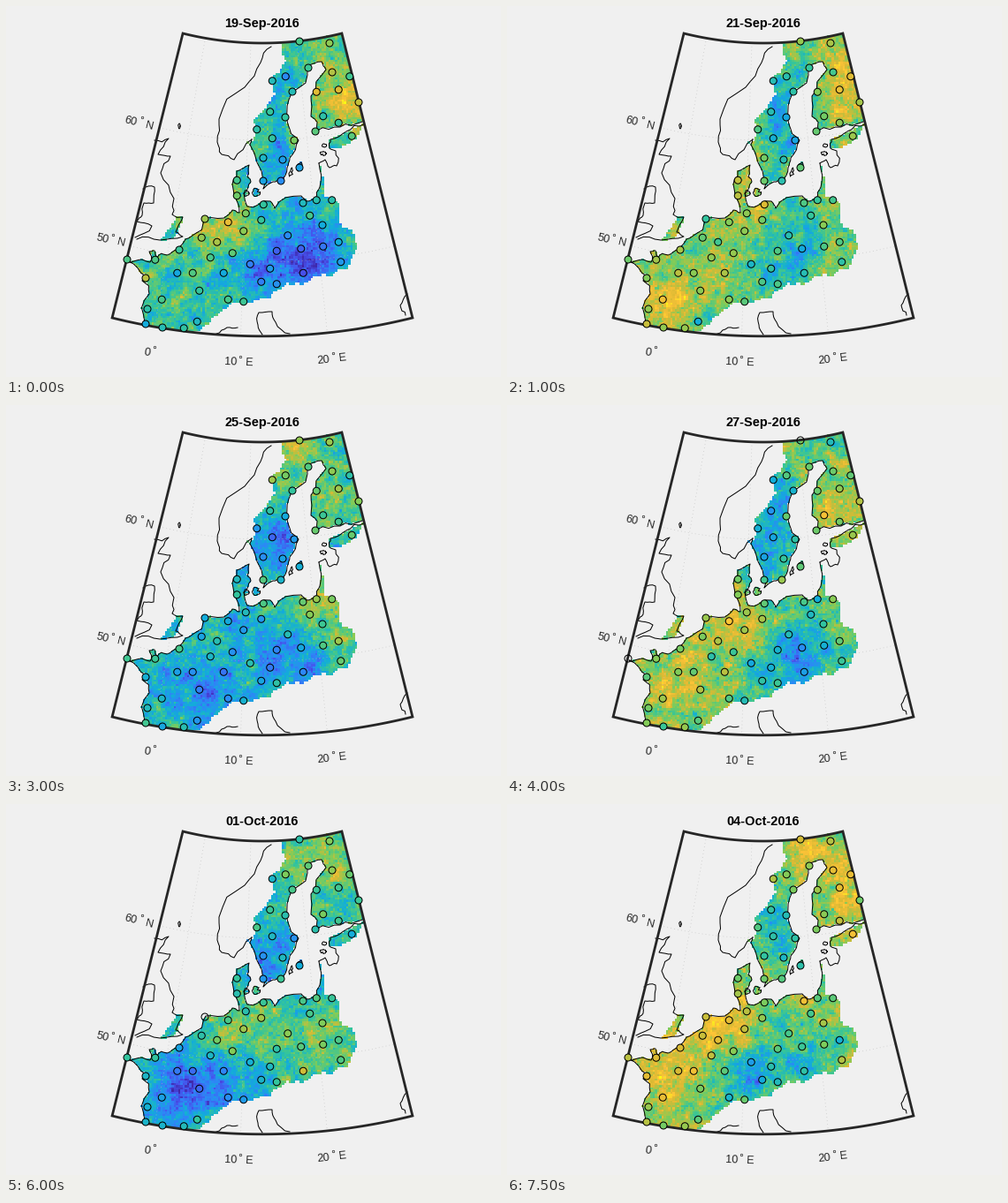
Write a matplotlib script that moves like this. It is 560x420 px and loops after 8000 ms.

```python
import numpy as np
import matplotlib.pyplot as plt
from matplotlib.animation import FuncAnimation
from matplotlib.colors import LinearSegmentedColormap
from matplotlib.path import Path

W, H, DPI = 560, 420, 100
PX = 72 / DPI
INK = "#262626"
plt.rcParams["font.family"] = "Liberation Sans"

parula = LinearSegmentedColormap.from_list("parula", [
    (0, "#3e26a8"), (.12, "#4751ec"), (.25, "#2e87f7"), (.375, "#12adda"),
    (.5, "#35c59b"), (.625, "#81cc59"), (.75, "#d9ba34"), (.86, "#fdc338"),
    (1, "#f9fb15")])

# Conic projection of the map window
APEX = (290, -331)
R_TOP, R_BOTTOM, HALF = 373, 704.8, 13.95


def polar(r, deg):
    a = np.radians(deg)
    return APEX[0] + r * np.sin(a), APEX[1] + r * np.cos(a)


coast_rng = np.random.default_rng(3)


def rugged(*points, rounds=2, amount=.09):
    """Roughen a line of key points by midpoint displacement."""
    p = np.array(points, float)
    for _ in range(rounds):
        step = np.diff(p, axis=0)
        normal = step[:, ::-1] * (1, -1)
        mid = p[:-1] + step / 2 + normal * coast_rng.normal(0, amount, (len(step), 1))
        out = np.empty((2 * len(p) - 1, 2))
        out[::2], out[1::2] = p, mid
        p = out
    return p


continent = rugged(
    (157, 359), (162, 326), (154, 311), (158, 306), (138, 289), (153, 287),
    (163, 290), (162, 278), (168, 277), (171, 285), (182, 282), (195, 275),
    (203, 264), (217, 256), (226, 240), (252, 236), (256, 231), (264, 234),
    (257, 207), (261, 187), (275, 180), (273, 193), (277, 199), (269, 212),
    (273, 227), (299, 221), (304, 229), (334, 215), (341, 221), (350, 218),
    (355, 205), (354, 178))
inland = rugged(
    (358, 184), (360, 214), (376, 221), (397, 270), (386, 298), (352, 305),
    (335, 316), (317, 314), (298, 332), (256, 337), (218, 368), (157, 372))
baltic = rugged(
    (278, 151), (276, 157), (291, 198), (291, 207), (302, 199), (311, 199),
    (318, 183), (321, 172), (331, 152), (319, 134), (320, 106), (341, 78),
    (341, 68), (357, 63), (362, 72), (345, 102), (345, 125), (352, 141),
    (378, 137), (403, 131))
mountains = rugged(
    (392, 30), (306, 30), (317, 62), (301, 84), (304, 100), (279, 131),
    (284, 144), (269, 158))
norway = rugged(
    (300, 46), (288, 64), (270, 92), (241, 128), (239, 154), (244, 168),
    (258, 174), (278, 151))
britain = rugged(
    (168, 152), (184, 150), (172, 168), (186, 170), (175, 189), (190, 218),
    (188, 236), (200, 239), (192, 256), (200, 261), (174, 265), (148, 264))
wales = rugged(
    (155, 207), (168, 205), (167, 223), (156, 223), (154, 237), (148, 244),
    (165, 249), (146, 262))
estonia = rugged(
    (354, 178), (361, 174), (366, 183), (374, 181), (373, 164), (366, 161),
    (367, 151), (385, 142), (405, 134))
liguria = rugged((238, 371), (250, 364), (262, 364))
adriatic = rugged((290, 372), (285, 361), (286, 347), (301, 346), (305, 358),
                  (321, 371))
black_sea = rugged((454, 326), (446, 339), (452, 350))


def island(x, y, w, h, lean=0):
    t = np.linspace(0, 2 * np.pi, 9)
    cx, cy = w / 2 * np.cos(t), h / 2 * np.sin(t)
    return rugged(*zip(x + cx - lean * cy, y + cy), rounds=1, amount=.25)


zealand, funen = island(283, 211, 9, 9), island(272, 212, 6, 6)
gotland = island(332, 182, 5, 10, .3)
islands = [zealand, funen, gotland, island(322, 188, 2, 10, .3),
           island(359, 167, 7, 5), island(360, 158, 5, 4),
           island(196, 136, 2, 6)]

# Filled areas
east_england = [(174, 266), (187, 249), (195, 237), (201, 241), (194, 257),
                (188, 264)]
estonia_fill = [(366, 152), (394, 139), (405, 134), (396, 151), (376, 162),
                (366, 161)]
areas = [np.vstack([continent, inland]),
         np.vstack([baltic, [(406, 128)], mountains]),
         east_england, estonia_fill, zealand, funen, gotland]

# Raster of cells and its mask
CELL, X0, Y0, NX, NY = 2.5, 130, 31, 112, 138
gx, gy = np.meshgrid(X0 + CELL * (np.arange(NX) + .5),
                     Y0 + CELL * (np.arange(NY) + .5))
cells = np.column_stack([gx.ravel(), gy.ravel()])
mask = np.any([Path(a).contains_points(cells) for a in areas], axis=0)
mask = mask.reshape(NY, NX)
radius = np.hypot(gx - APEX[0], gy - APEX[1])
angle = np.degrees(np.arctan2(gx - APEX[0], gy - APEX[1]))
mask &= (radius > R_TOP) & (radius < R_BOTTOM) & (abs(angle) < HALF)


def place_stations(keys, count, gap, seed=5):
    """Keep the key stations, fill the land with evenly spaced others."""
    found = list(keys)
    land = cells[mask.ravel()]
    for p in np.random.default_rng(seed).permutation(land):
        if len(found) == count:
            break
        if np.hypot(*(np.array(found) - p).T).min() > gap:
            found.append(tuple(p))
    return np.array(found)


# The first three fail on some days
stations = place_stations([
    (332, 40), (137, 287), (225, 241), (366, 42), (342, 70), (369, 75),
    (324, 97), (399, 109), (316, 126), (350, 142), (326, 152), (291, 172),
    (313, 174), (332, 183), (291, 198), (311, 198), (336, 223), (358, 248),
    (196, 276), (158, 308), (160, 343), (158, 360), (177, 364)], 69, 15.5)
missing = {4: [0], 8: [0, 1], 12: [2]}

# Daily weather: a mean level plus warm and cold spots
SPREAD = 30
weather = {}


def day(n, mean, *spots):
    weather[n] = np.full((NY, NX), float(mean))
    for x, y, gain in spots:
        d2 = (gx - x) ** 2 + (gy - y) ** 2
        weather[n] += gain * np.exp(-d2 / (2 * SPREAD ** 2))


day(0, .52, (378, 100, .2), (248, 250, .18), (345, 282, -.35),
    (285, 306, -.25), (316, 90, -.14), (312, 190, -.16))
day(2, .6, (382, 80, .18), (320, 120, -.24), (325, 288, -.2),
    (175, 338, .13), (268, 215, .1), (310, 185, -.12))
day(4, .52, (382, 75, .15), (385, 150, .16), (305, 140, -.17),
    (250, 250, .17), (190, 318, .14), (228, 348, -.3))
day(6, .44, (325, 48, .25), (370, 115, .14), (308, 158, -.2),
    (362, 235, .26), (318, 284, -.18), (230, 330, -.2))
day(8, .58, (375, 110, .17), (310, 95, -.17), (290, 165, -.2),
    (260, 250, .18), (195, 308, .12), (325, 290, -.3))
day(12, .48, (365, 60, .15), (305, 178, -.22), (255, 252, .18),
    (350, 245, .08), (190, 325, -.26), (245, 325, -.2))
day(15, .64, (378, 90, .14), (300, 140, -.24), (235, 248, .17),
    (180, 310, .1), (335, 290, -.2), (275, 312, -.2))


def climate(i):
    a = max(k for k in weather if k <= i)
    b = min(k for k in weather if k >= i)
    t = (i - a) / max(b - a, 1)
    return (1 - t) * weather[a] + t * weather[b]


freq = np.hypot(np.fft.fftfreq(NY)[:, None], np.fft.fftfreq(NX)[None])
spectrum = (freq ** 2 + .06 ** 2) ** -.75


def grain(rng):
    noise = np.fft.fft2(rng.normal(size=(NY, NX))) * spectrum
    noise = np.fft.ifft2(noise).real
    noise = (noise - noise.mean()) / noise.std()
    return .07 * noise + rng.normal(0, .04, (NY, NX))


fig = plt.figure(figsize=(W / DPI, H / DPI), dpi=DPI, facecolor="#f0f0f0")
ax = fig.add_axes([0, 0, 1, 1])
ax.axis("off")
field = ax.imshow(np.zeros((NY, NX, 4)), interpolation="nearest", aspect="auto",
                  extent=(X0, X0 + CELL * NX, Y0 + CELL * NY, Y0), zorder=1)
ax.set(xlim=(0, W), ylim=(H, 0))

for coast in (continent, baltic, norway, britain, wales, estonia, liguria,
              adriatic, black_sea, *islands):
    ax.plot(*coast.T, color="black", lw=PX, zorder=2)

sweep = np.linspace(-HALF, HALF, 80)
grid = dict(lw=.8 * PX, color="#bcbcbc", ls=(0, (1, 4)), zorder=2.5, alpha=.8)
for r in (483, 621):
    ax.plot(*polar(r, sweep), **grid)
for deg in (-9.96, -1.99, 5.98):
    ax.plot(*polar(np.array([R_TOP, R_BOTTOM]), deg), **grid)

border = np.hstack([polar(R_TOP, sweep), polar(R_BOTTOM, sweep[::-1])])
ax.fill(*border, fill=False, ec=INK, lw=2.8 * PX, zorder=3)


def label(x, y, tilt, number, hemi=""):
    c, s = np.cos(np.radians(tilt)), np.sin(np.radians(tilt))

    def at(dx, dy):
        return x + dx * c + dy * s, y - dx * s + dy * c

    style = dict(rotation=tilt, rotation_mode="anchor", va="baseline",
                 fontsize=12.7 * PX, color=INK)
    ax.text(*at(-3.5, 4.5), number, ha="right", **style)
    ax.text(*at(6.5, 4.5), hemi, ha="left", **style)
    ax.plot(*at(.2, -6), "o", ms=2.5 * PX, mfc="none", mec=INK, mew=.7 * PX)


label(152, 132, -14, "60", "N")
label(119.5, 264.5, -14, "50", "N")
label(167, 392, -10, "0")
label(264.5, 402.5, -2, "10", "E")
label(370, 398.5, 6, "20", "E")

title = ax.text(289.8, 24, "", ha="center", va="baseline", weight="bold",
                fontsize=14.5 * PX, color="black")
dots = ax.scatter(*stations.T, s=(8 * PX) ** 2, ec="black", lw=PX, zorder=4)
col = np.clip((stations[:, 0] - X0) / CELL, 0, NX - 1).astype(int)
row = np.clip((stations[:, 1] - Y0) / CELL, 0, NY - 1).astype(int)


def draw(i):
    value = climate(i) + grain(np.random.default_rng(190 + i))
    rgba = parula(np.clip(value, 0, 1))
    face = rgba[row, col]
    face[missing.get(i, []), 3] = 0
    dots.set_facecolor(face)
    rgba[..., 3] = mask
    field.set_data(rgba)

    d = 19 + i
    title.set_text(f"{d}-Sep-2016" if d <= 30 else f"{d - 30:02d}-Oct-2016")
    return field, dots, title


anim = FuncAnimation(fig, draw, frames=16, init_func=lambda: draw(0),
                     interval=500, repeat=True, repeat_delay=0)
plt.show()
```
